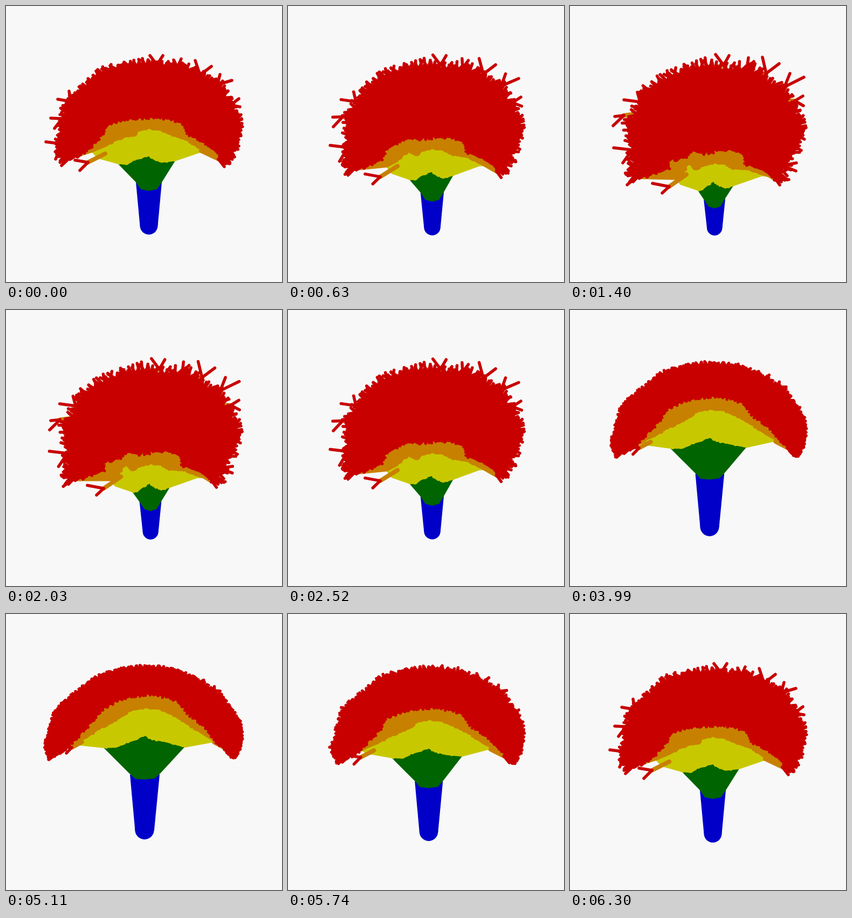
Recreate the animation shown at these times as an HTML page with a canvas. Size 512 by 512 pixels, loop 6.37 s.

```html
<!DOCTYPE html>
<html lang="en">
<head>
<meta charset="utf-8">
<title>Swaying bloom</title>
<style>
html, body { margin: 0; width: 100%; height: 100%; overflow: hidden; background: #f8f8f8; }
canvas { display: block; width: 100vmin; height: 100vmin; }
</style>
</head>
<body>
<canvas id="stage" width="512" height="512"></canvas>
<script>
const ctx = document.getElementById('stage').getContext('2d');
const STEP = 70, STEPS = 91;
const RED = '#c80000', ORANGE = '#c88000', YELLOW = '#c8c800', GREEN = '#006400', BLUE = '#0000c8';

// Each edge runs left to right in three poses: closed, middle, open.
const NODES = [0.985, 0, -0.927];
const stem = [
  [254,412, 248,358, 288,358, 282.5,412, 268.2,411.5],
  [248.5,408, 241,327, 289,327, 281.5,408, 265,407.5],
  [239.5,402, 230,298, 285,298, 274.8,402, 257,400.5]
];
const calyx = [
  [237,342, 249,360, 257,372, 268,375.5, 279,372, 288,357, 304,332],
  [206,291, 241,327, 250,340, 265,343, 280,340, 289,327, 314,287],
  [181,248, 230,297, 240,306, 257,307, 276,305, 285,297, 332,246]
];
const yellowEdge = [
  [205,331, 238,342, 245,341, 251,333, 258,332, 265,323, 273,330, 288,338, 304,333, 356,315],
  [170,282, 206,292, 225,294, 234,286, 250,283, 262,277, 274,283, 288,290, 314,287, 358,272],
  [125,242, 182,248, 205,247, 222,239, 242,233, 256,224, 270,232, 296,237, 332,247, 386,237]
];
const orangeEdge = [
  [198,322, 212,312, 214,296, 222,291, 232,303, 248,296, 266,291, 290,294, 300,302, 335,304, 352,312, 366,316],
  [160,271, 186,260, 205,248, 222,243, 238,240, 243,232, 262,227, 288,231, 308,240, 340,251, 356,264, 374,270],
  [118,243, 150,230, 172,213, 198,202, 214,189, 234,178, 256,174, 286,177, 310,188, 342,208, 366,224, 392,240]
];
const redEdge = [
  [120,320, 150,312, 182,300, 176,286, 212,281, 224,266, 246,272, 272,267, 302,265, 326,274, 328,292, 362,304, 374,314, 386,325],
  [110,287, 140,275, 158,260, 178,238, 184,221, 212,212, 240,208, 272,206, 304,208, 332,220, 338,236, 372,256, 392,270, 402,288],
  [84,266, 112,250, 134,226, 160,198, 176,178, 206,160, 238,152, 264,148, 304,154, 322,163, 338,184, 372,212, 392,240, 420,264]
];
const crown = [
  [118,322, 120,290, 116,255, 112,220, 130,185, 140,160, 180,135, 212,122, 248,112, 290,118, 330,117, 358,135, 395,160, 410,190, 424,212, 426,245, 402,282, 386,322],
  [108,285, 98,262, 104,225, 110,192, 128,165, 155,143, 178,122, 215,112, 250,107, 290,110, 325,112, 362,128, 398,148, 414,180, 430,205, 431,240, 416,275, 404,290],
  [82,268, 74,243, 82,215, 90,185, 108,163, 140,138, 170,117, 210,103, 245,99, 285,99, 320,107, 362,125, 398,152, 415,175, 432,198, 437,232, 428,258, 420,266]
];
// Forked tips: joint and two ends, middle pose then closed pose.
const forks = [
  [280,109, 267,92, 291,92, 285,110, 270,90, 295,92],
  [360,128, 351,101, 381,112, 364,125, 357,95, 388,107],
  [392,146, 397,127, 419,138, 398,150, 408,125, 434,132],
  [416,184, 432,172, 434,187, 417,176, 432,167, 433,185],
  [120,177, 96,173, 117,158, 130,178, 100,174, 125,160],
  [104,209, 83,208, 90,227, 100,203, 83,205, 80,222],
  [105,256, 74,252, 92,284, 115,267, 81,263, 98,291],
  [152,290, 137,305, 128,286, 184,335, 171,347, 153,329],
  [394,284, 405,298, 413,283, 382,322, 389,332, 406,322],
  [408,264, 428,264, 424,280, 394,296, 419,306, 420,291],
  [124,276, 103,296, 98,275, 134,308, 117,326, 108,292],
  [318,114, 311,100, 325,98, 328,116, 331,96, 341,103]
];

let seed = 17;
function rnd() {
  seed = (seed * 16807) % 2147483647;
  return seed / 2147483647;
}
function scatter(n) {
  return Array.from({ length: n }, (_, i) =>
    ({ u: (i + rnd()) / n, turn: rnd() * 2 - 1, size: rnd() }));
}
const outerHairs = scatter(170), innerHairs = scatter(60);
const yellowBumps = scatter(26), orangeBumps = scatter(38), redBumps = scatter(50);

// Quadratic blend through the three poses.
function blend(poses, s) {
  const w = NODES.map((a, i) => NODES.reduce((p, b, j) => i === j ? p : p * (s - b) / (a - b), 1));
  const flat = poses[0].map((_, i) => w[0] * poses[0][i] + w[1] * poses[1][i] + w[2] * poses[2][i]);
  const pts = [];
  for (let i = 0; i < flat.length; i += 2) pts.push([flat[i], flat[i + 1]]);
  return pts;
}
function along(pts, u) {
  const f = u * (pts.length - 1), i = Math.min(pts.length - 2, Math.floor(f)), k = f - i;
  return [0, 1].map(c => pts[i][c] + (pts[i + 1][c] - pts[i][c]) * k);
}
function fill(pts, color, edge = 0) {
  ctx.beginPath();
  pts.forEach(p => ctx.lineTo(p[0], p[1]));
  ctx.closePath();
  ctx.fillStyle = ctx.strokeStyle = color;
  ctx.fill();
  if (edge) {
    ctx.lineWidth = edge;
    ctx.stroke();
  }
}
function dot(x, y, r, color) {
  ctx.beginPath();
  ctx.arc(x, y, r, 0, 7);
  ctx.fillStyle = color;
  ctx.fill();
}
function stick(x, y, x2, y2, width, color) {
  ctx.beginPath();
  ctx.moveTo(x, y);
  ctx.lineTo(x2, y2);
  ctx.lineWidth = width;
  ctx.strokeStyle = color;
  ctx.stroke();
}
function band(low, high, color, edge) {
  fill(low.concat(high.slice().reverse()), color, edge);
}
function bumps(list, edge, color, r) {
  for (const b of list) {
    const [x, y] = along(edge, 0.12 + b.u * 0.76);
    dot(x, y - 2 + b.turn, r + b.size * 1.5, color);
  }
}
function hairs(list, edge, reach, sign, s) {
  for (const h of list) {
    const [x, y] = along(edge, h.u);
    const a = Math.atan2(y - 255 - 25 * s, x - 260) + h.turn * 0.75;
    const dx = Math.cos(a) * sign, dy = Math.sin(a) * sign;
    const len = reach * (0.25 + 0.75 * h.size);
    stick(x - dx * 6, y - dy * 6, x + dx * len, y + dy * len, 5.5, RED);
  }
}
function forkAt(f, s) {
  const p = f.slice(0, 6).map((v, i) => v + (f[i + 6] - v) * s / NODES[0]);
  const k = 1 + 0.45 * Math.min(0, s);
  return p.map((v, i) => i < 2 ? v : p[i % 2] + (v - p[i % 2]) * k);
}

function draw(s) {
  ctx.fillStyle = '#f8f8f8';
  ctx.fillRect(0, 0, 512, 512);
  ctx.lineCap = ctx.lineJoin = 'round';

  // The stem list has an odd length; its last pair is the foot.
  const body = blend(stem, s);
  const foot = body.pop();
  fill(body, BLUE);
  dot(foot[0], foot[1], (body[3][0] - body[0][0]) / 2, BLUE);

  const low = blend(calyx, s), yel = blend(yellowEdge, s), ora = blend(orangeEdge, s);
  const red = blend(redEdge, s), top = blend(crown, s);
  const tips = forks.map(f => forkAt(f, s));

  band(low, yel, GREEN);
  band(yel, ora, YELLOW, 1.5);
  bumps(yellowBumps, yel, YELLOW, 2.5);
  band(ora, red, ORANGE, 1.5);
  bumps(orangeBumps, ora, ORANGE, 3);
  const stalk = 32 + 14 * Math.min(0, s);
  for (const [x, y] of tips) {
    stick(x, y, x + (x < 260 ? stalk : -stalk), y + (175 - y) * 0.14, 8, ORANGE);
  }

  band(red, top, RED, 2);
  bumps(redBumps, red, RED, 2.5);
  hairs(innerHairs, red, 3 + 2 * Math.max(0, s), -1, s);
  hairs(outerHairs, top, 10.5 + 7 * s, 1, s);
  for (const [x, y, ax, ay, bx, by] of tips) {
    stick(x, y, ax, ay, 5.5, RED);
    stick(x, y, bx, by, 5.5, RED);
  }
}

let shown = -1;
function tick() {
  const i = Math.floor(performance.now() / STEP) % STEPS;
  if (i !== shown) {
    shown = i;
    draw(Math.sin(2 * Math.PI * i / (STEPS - 1)));
  }
  requestAnimationFrame(tick);
}
tick();
</script>
</body>
</html>
```
